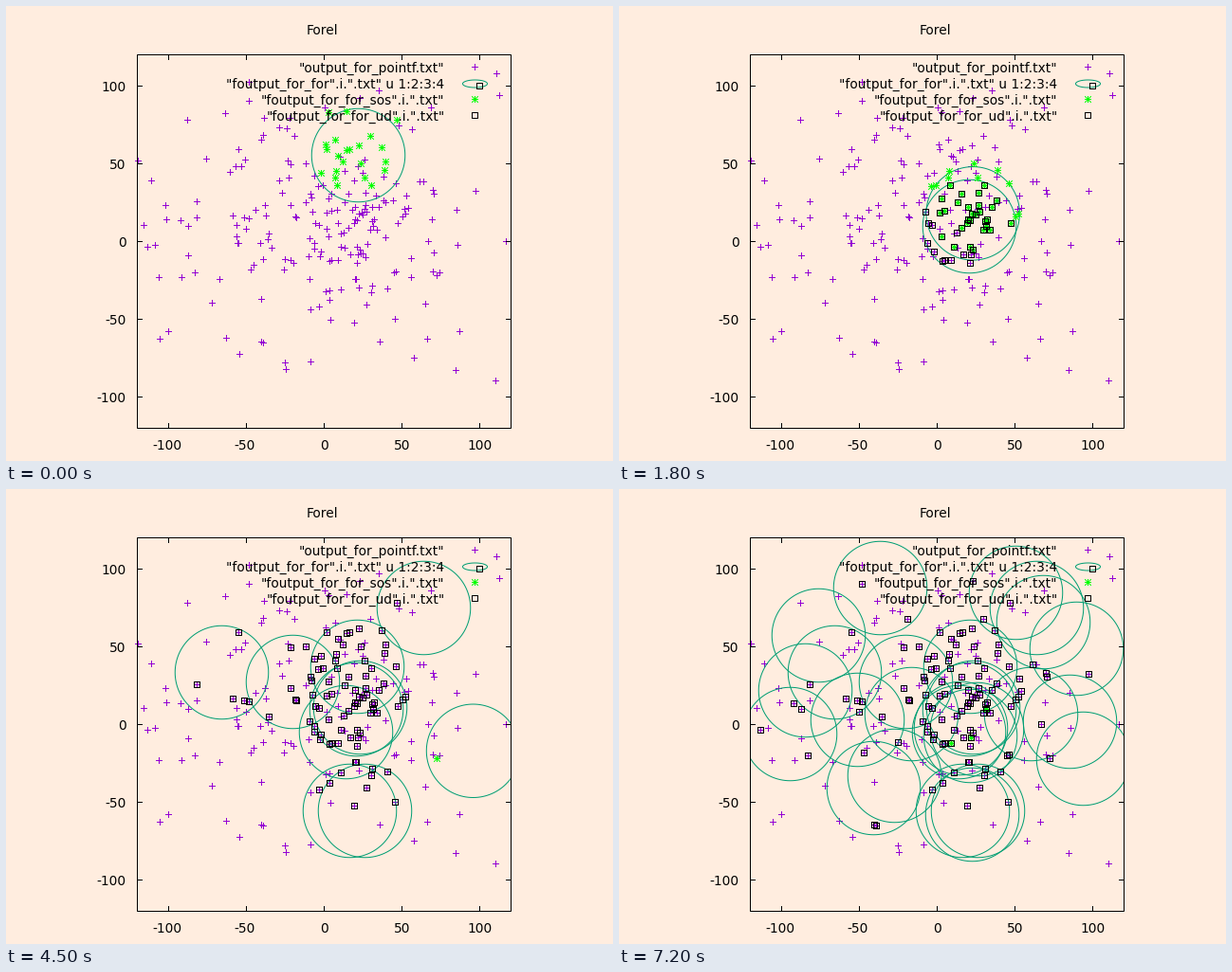
A matplotlib script that plays this animation: 640 by 480 pixels, repeating every 7.3 s.

```python
import numpy as np
import matplotlib.pyplot as plt
from matplotlib.animation import FuncAnimation
from matplotlib.collections import LineCollection
from matplotlib.patches import Rectangle

W, H, DPI = 640, 480, 100
FRAMES, STEP = 73, 100
PX = 72 / DPI
LEFT, TOP, RIGHT, BOTTOM = 138, 51, 532, 445
UNIT = (RIGHT - LEFT) / 240
RADIUS = 30 * UNIT
PAPER, PLUM, TEAL, LIME = "#ffeddf", "#9400d3", "#009e73", "#00ff00"

# Searches in order: frames taken and the centre where the circle settles
SEARCHES = [
    (12, 369, 232), (11, 373, 230), (4, 370, 187), (4, 302, 203),
    (2, 362, 339), (2, 227, 193), (2, 440, 125), (4, 378, 339),
    (4, 358, 256), (4, 489, 284), (2, 434, 237), (1, 251, 243),
    (1, 447, 140), (4, 360, 252), (2, 418, 109), (1, 275, 104),
    (1, 210, 154), (1, 372, 343), (2, 482, 168), (1, 370, 260),
    (1, 196, 212), (1, 180, 258), (1, 268, 315), (1, 290, 302),
    (2, 475, 245), (1, 308, 237), (1, 377, 253),
]
FIRST_GUESS = np.array([371, 157])  # shared by the first three searches
OUTLIERS = [(517, 71), (516, 395), (139, 163), (171, 343), (191, 120),
            (295, 383), (157, 252), (256, 80), (527, 248), (232, 350),
            (321, 375), (430, 371)]

rng = np.random.default_rng(11)


def cloud(count, centre, spread):
    """Normally scattered whole-pixel points, kept inside the plot."""
    pts = np.rint(rng.normal(centre, spread, (4 * count, 2)))
    inside = ((pts > (LEFT + 6, TOP + 34)) &
              (pts < (RIGHT - 6, BOTTOM - 60))).all(axis=1)
    return pts[inside][:count]


# Strays are only plotted; the searches look at the candidates
strays = np.concatenate([OUTLIERS, cloud(92, (318, 222), (100, 72))])
candidates = np.concatenate([cloud(60, (366, 217), (28, 38)),
                             cloud(65, (335, 235), (100, 76))])
# How many searches a claimed point survives before it is dropped
stamina = rng.exponential(10, len(candidates))

spans = np.array([s[0] for s in SEARCHES])
begins = np.cumsum(spans) - spans
ends = np.array([s[1:] for s in SEARCHES], float)
guesses = ends + rng.normal(0, 4, ends.shape) * np.sqrt(spans - 1)[:, None]
guesses[:3] = FIRST_GUESS


def near(centre):
    return np.hypot(*(candidates - centre).T) <= RADIUS


# The search that first claims each candidate, or one past the last
hits = np.array([near(c) for c in ends])
owner = np.where(hits.any(axis=0), hits.argmax(axis=0), len(SEARCHES))

PLUS = np.array([[(-3.5, 0), (3.5, 0)], [(0, -3.5), (0, 3.5)]])
CROSS = np.array([[(-3.3, -3.3), (3.3, 3.3)], [(-3.3, 3.3), (3.3, -3.3)]])
STAR = np.concatenate([PLUS, CROSS])
BOX = np.array([[(-3.5, -3), (3.5, -3)], [(-3.5, 3), (3.5, 3)],
                [(-3, -3.5), (-3, 3.5)], [(3, -3.5), (3, 3.5)]])
ANGLE = np.linspace(0, 2 * np.pi, 121)
RING = np.column_stack([np.cos(ANGLE), np.sin(ANGLE)])


def stamp(shape, spots):
    return [seg + np.array(p) + 0.5 for p in spots for seg in shape]


def drift(k, step):
    """Centre of search k; the step before the first lies further back."""
    if step < 0:
        return guesses[k] + 0.13 * (guesses[k] - ends[k])
    u = step / max(spans[k] - 1, 1) if spans[k] > 1 else 1
    return guesses[k] + (ends[k] - guesses[k]) * (1 - (1 - u) ** 2)


fig = plt.figure(figsize=(W / DPI, H / DPI), dpi=DPI, facecolor=PAPER)
ax = fig.add_axes([0, 0, 1, 1])
ax.set_xlim(0, W)
ax.set_ylim(H, 0)
ax.axis("off")
border = Rectangle((LEFT + 0.5, TOP + 0.5), RIGHT - LEFT, BOTTOM - TOP,
                   fill=False, ec="black", lw=PX, zorder=6, snap=False)
ax.add_patch(border)


def layer(color, z, segs=()):
    lines = LineCollection(list(segs), colors=color, linewidths=PX, zorder=z)
    lines.set_snap(False)
    ax.add_collection(lines, autolim=False)
    return lines


def label(x, y, text, ha):
    ax.text(x, y + 5, text, ha=ha, va="baseline", color="black", zorder=7,
            family="DejaVu Sans", fontsize=13.8 * PX)


layer(PLUM, 1, stamp(PLUS, np.concatenate([strays, candidates])))
rings = layer(TEAL, 2)
rings.set_clip_path(border)
stars = layer(LIME, 3)
boxes = layer("black", 4)

# Border ticks and their labels
ticks = []
for v in range(-100, 101, 50):
    x = round(LEFT + (120 + v) * UNIT) + 0.5
    y = round(TOP + (120 - v) * UNIT) + 0.5
    ticks += [[(x, BOTTOM), (x, BOTTOM - 5)], [(x, TOP), (x, TOP + 6)],
              [(LEFT, y), (LEFT + 6, y)], [(RIGHT, y), (RIGHT - 5, y)]]
    label(x - (2 if v < 0 else 0), 462.5, str(v), "center")
    label(126.5, y, str(v), "right")
layer("black", 6, ticks)

# Title and key
label(333.5, 25.5, "Forel", "center")
key = ['"output_for_pointf.txt"', '"foutput_for_for".i.".txt" u 1:2:3:4',
       '"foutput_for_for_sos".i.".txt"', '"foutput_for_for_ud".i.".txt"']
for row, text in enumerate(key):
    label(462.5, 64.5 + 17 * row, text, "right")
layer(PLUM, 7, stamp(PLUS, [(494, 64)]))
layer(TEAL, 7, [RING * (13, 4) + (494.5, 82)])
layer(LIME, 7, stamp(STAR, [(494, 98)]))
layer("black", 7, stamp(BOX, [(494, 115), (499, 84)]))


def draw(i):
    k = int(np.searchsorted(begins, i, side="right")) - 1
    step = i - begins[k]
    claimed = owner < k
    lit = near(drift(k, step - 1)) & (~claimed | (stamina > k))
    centres = [*ends[:k], drift(k, step)]
    rings.set_segments([RING * RADIUS + c + 0.5 for c in centres])
    stars.set_segments(stamp(STAR, candidates[lit]))
    boxes.set_segments(stamp(BOX, candidates[claimed]))
    return rings, stars, boxes


anim = FuncAnimation(fig, draw, frames=FRAMES, interval=STEP, repeat=True,
                     repeat_delay=0, blit=False)
plt.show()
```
